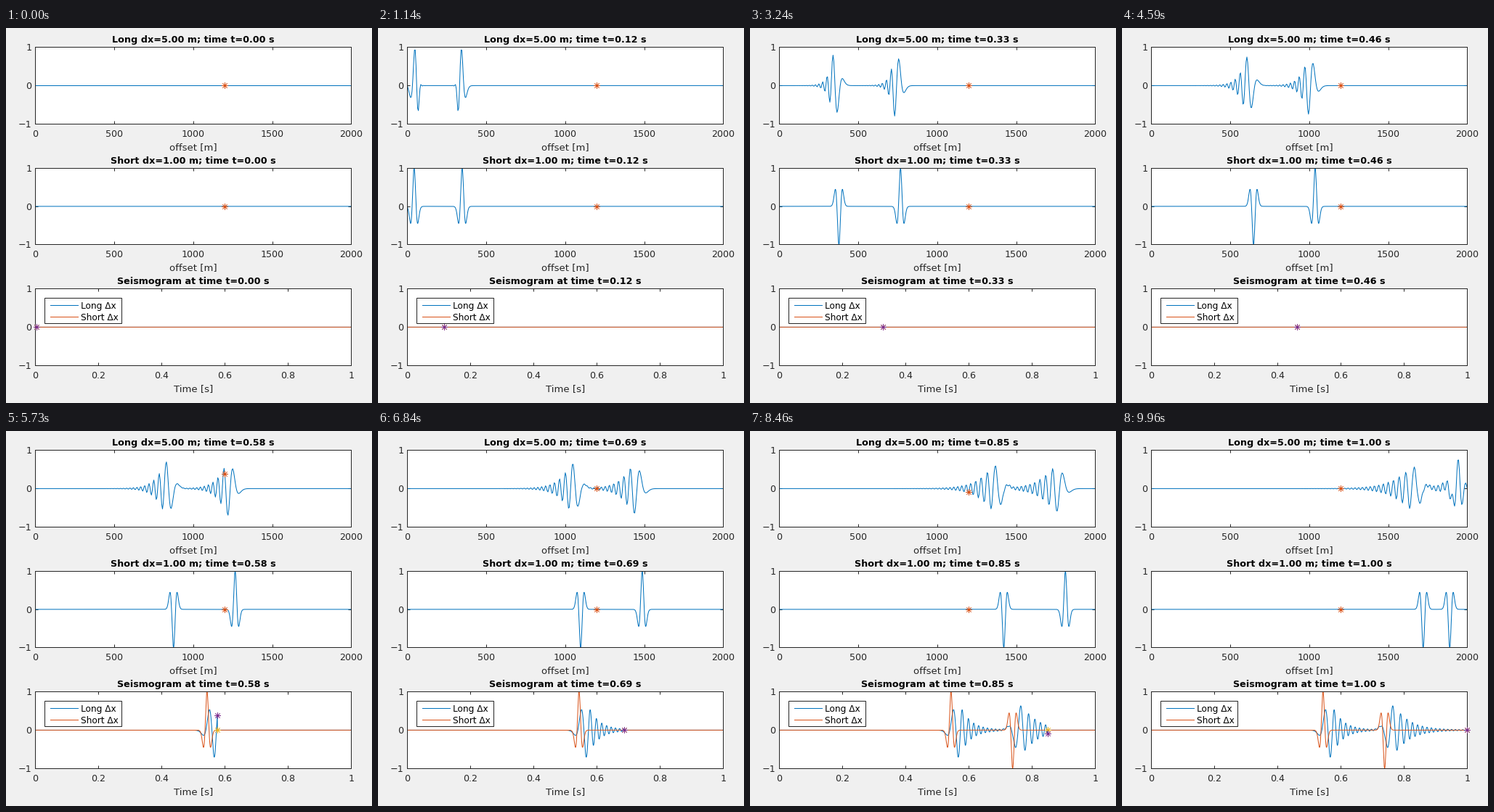
These frames come from a looping animation (504 by 517 pixels, 9990 ms). A matplotlib script:

```python
import numpy as np
import matplotlib.pyplot as plt
from matplotlib.animation import FuncAnimation
from matplotlib.patches import Rectangle

W, H, DPI = 504, 517, 100
PT = 72 / DPI
FRAMES, INTERVAL = 333, 30

# Wave model
SPEED, LENGTH, DURATION, DT = 2000.0, 2000.0, 1.0, 0.0005
SOURCE_X, RECEIVER_X = 195.0, 1200.0
FREQ, DELAY = 35.0, 0.041
STEPS = round(DURATION / DT)
STRIDE = 6

BLUE, ORANGE, YELLOW, PURPLE = "#0072bd", "#d95319", "#edb120", "#7e2f8e"
INK = "#262626"

plt.rcParams["font.family"] = "DejaVu Sans"


def ricker_slope(t):
    """Time derivative of a unit Ricker wavelet."""
    a = np.pi * FREQ
    u = a * (t - DELAY)
    return a * (4 * u**3 - 6 * u) * np.exp(-u**2)


def simulate(dx):
    """Second-order finite differences with fixed ends."""
    n = round(LENGTH / dx) + 1
    src, rec = round(SOURCE_X / dx), round(RECEIVER_X / dx)
    courant2 = (SPEED * DT / dx) ** 2
    old, now = np.zeros(n), np.zeros(n)
    trace = np.zeros(STEPS + 1)
    shots = []
    for step in range(1, STEPS + 1):
        new = np.zeros(n)
        new[1:-1] = (2 * now[1:-1] - old[1:-1]
                     + courant2 * (now[2:] - 2 * now[1:-1] + now[:-2]))
        new[src] += 2 * SPEED * DT**2 / dx * ricker_slope((step - 1) * DT)
        old, now = now, new
        trace[step] = now[rec]
        if step % STRIDE == 0:
            shots.append(now)
    return np.arange(n) * dx, shots, trace


def label(x, y, s, size, **kw):
    return fig.text(x / W, 1 - y / H, s, fontsize=size * PT, va="baseline", **kw)


def panel(top, bottom, xmax, ticks, xlabel):
    ax = fig.add_axes([40.4 / W, 1 - bottom / H, 435 / W, (bottom - top) / H])
    ax.set(xlim=(0, xmax), ylim=(-1, 1), xticks=ticks, yticks=[-1, 0, 1])
    ax.set_xticklabels([f"{t:g}" for t in ticks])
    ax.set_yticklabels(["\u22121", "0", "1"])
    ax.tick_params(direction="in", top=True, right=True, length=4.4 * PT,
                   width=PT, color=INK, labelcolor=INK, labelsize=12.6 * PT)
    ax.tick_params(axis="x", pad=8 * PT)
    ax.tick_params(axis="y", pad=5 * PT)
    for spine in ax.spines.values():
        spine.set(linewidth=PT, color=INK)
    label(258, bottom + 36, xlabel, 13.3, ha="center", color=INK)
    title = label(258, top - 6.4, "", 12.7, ha="center", weight="bold", color="black")
    return ax, title


def curve(ax, color):
    return ax.plot([], [], color=color, lw=PT)[0]


def star(ax, color):
    return ax.plot([], [], marker=(8, 2, 0), ms=8.5 * PT, mec=color, mew=0.7 * PT,
                   ls="none", clip_on=False, zorder=5)[0]


def draw_legend():
    box = Rectangle((53.4 / W, 1 - 407.4 / H), 106 / W, 35 / H, fc="white",
                    ec=INK, lw=PT, transform=fig.transFigure, zorder=6)
    fig.add_artist(box)
    for y, color, name in ((382.4, BLUE, "Long"), (398.4, ORANGE, "Short")):
        key = plt.Line2D([61 / W, 99 / W], [1 - y / H] * 2, color=color, lw=PT,
                         transform=fig.transFigure, zorder=7)
        fig.add_artist(key)
        label(103, y + 5, f"{name} \u0394x", 12.1, color="black", zorder=7)


fig = plt.figure(figsize=(W / DPI, H / DPI), dpi=DPI, facecolor="#f0f0f0")
offsets = range(0, 2001, 500)
long_ax, long_title = panel(26.4, 132.4, LENGTH, offsets, "offset [m]")
short_ax, short_title = panel(193.4, 298.4, LENGTH, offsets, "offset [m]")
seis_ax, seis_title = panel(359.4, 465.4, DURATION, np.arange(6) / 5, "Time [s]")
draw_legend()

long_x, long_shots, long_trace = simulate(5.0)
short_x, short_shots, short_trace = simulate(1.0)
times = np.arange(STEPS + 1) * DT

long_line, short_line = curve(long_ax, BLUE), curve(short_ax, BLUE)
long_seis, short_seis = curve(seis_ax, BLUE), curve(seis_ax, ORANGE)
long_star, short_star = star(long_ax, ORANGE), star(short_ax, ORANGE)
short_now, long_now = star(seis_ax, YELLOW), star(seis_ax, PURPLE)


def update(i):
    step = STRIDE * (i + 1)
    t = step * DT
    long_line.set_data(long_x, long_shots[i])
    short_line.set_data(short_x, short_shots[i])

    recorded = np.arange(STEPS + 1) <= step
    long_seis.set_data(times, long_trace * recorded)
    short_seis.set_data(times, short_trace * recorded)

    for mark, trace in ((long_star, long_trace), (short_star, short_trace)):
        mark.set_data([RECEIVER_X], [trace[step]])
    for mark, trace in ((long_now, long_trace), (short_now, short_trace)):
        mark.set_data([t], [trace[step]])

    long_title.set_text(f"Long dx=5.00 m; time t={t:.2f} s")
    short_title.set_text(f"Short dx=1.00 m; time t={t:.2f} s")
    seis_title.set_text(f"Seismogram at time t={t:.2f} s")
    return ()


anim = FuncAnimation(fig, update, frames=FRAMES, interval=INTERVAL, repeat=True,
                     repeat_delay=0, cache_frame_data=False)
plt.show()
```
